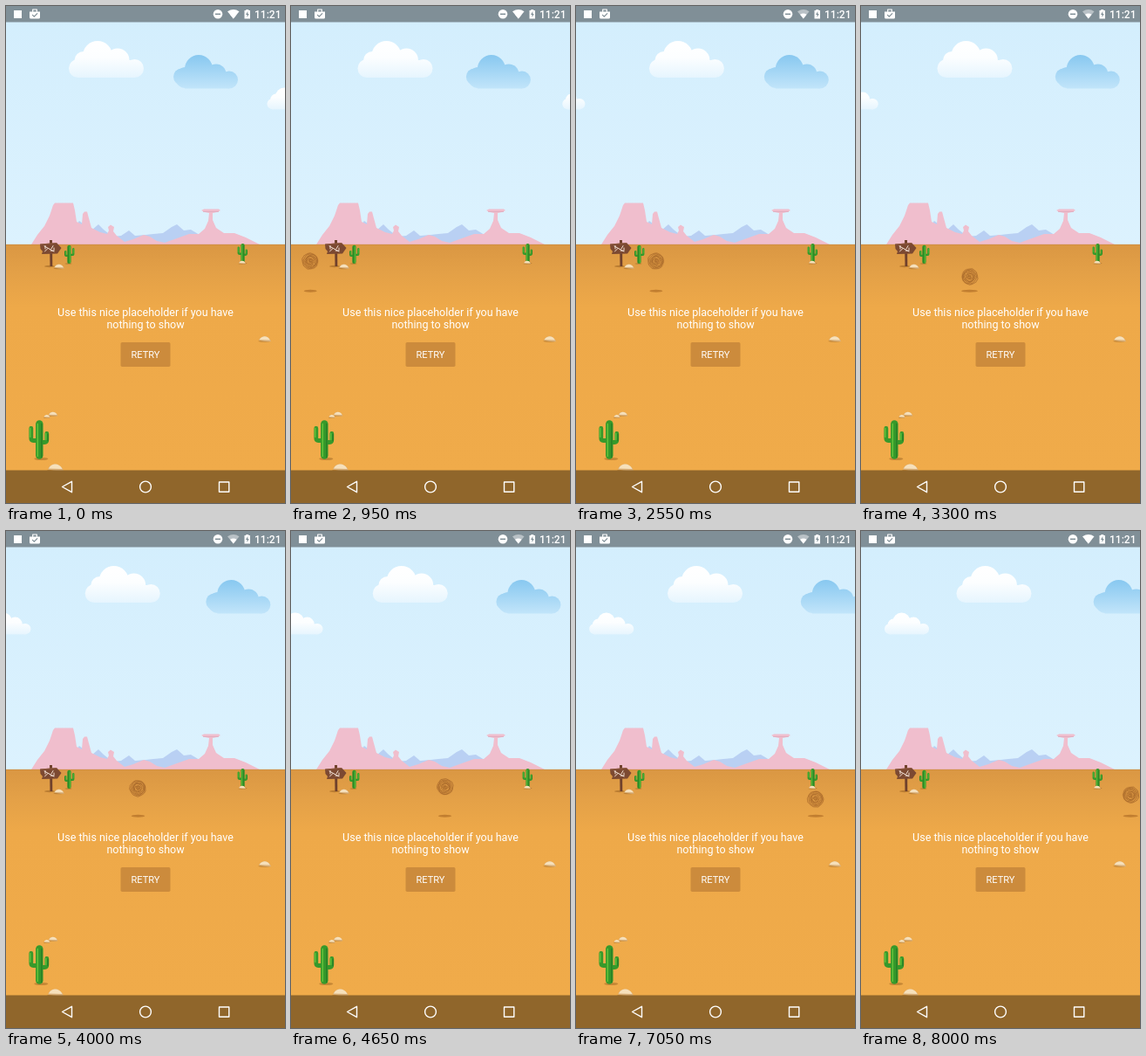
These frames come from a looping animation (320 by 569 pixels, 8050 ms). An HTML page:

```html
<!DOCTYPE html>
<html lang="en">
<head>
<meta charset="utf-8">
<title>Desert placeholder</title>
<style>
  html, body { margin: 0; width: 100%; height: 100%; overflow: hidden; background: #efaa49; }
  svg { display: block; width: 100vw; height: 100vh; }
  text { font-family: Roboto, "Noto Sans", sans-serif; fill: #fff; }
  .msg { font-size: 12.5px; text-anchor: middle; }
  .retry { font-size: 11px; text-anchor: middle; }
  .clock { font-size: 12px; font-weight: 500; }
  .line { fill: none; stroke-linecap: round; stroke-linejoin: round; }
</style>
</head>
<body>
<svg viewBox="0 0 320 569" xmlns="http://www.w3.org/2000/svg">
  <defs>
    <linearGradient id="sky" x2="0" y2="1">
      <stop stop-color="#d3eefd"/><stop offset="1" stop-color="#dcf2fe"/>
    </linearGradient>
    <linearGradient id="sand" x2="0" y2="1">
      <stop stop-color="#da9743"/><stop offset=".12" stop-color="#e3a047"/>
      <stop offset=".28" stop-color="#eea949"/><stop offset="1" stop-color="#f0ab4a"/>
    </linearGradient>
    <linearGradient id="white" gradientUnits="userSpaceOnUse" x1="0" x2="0" y1="0" y2="42">
      <stop stop-color="#fff"/><stop offset=".45" stop-color="#fcfeff"/><stop offset="1" stop-color="#e6f5fe"/>
    </linearGradient>
    <linearGradient id="blue" gradientUnits="userSpaceOnUse" x1="0" x2="0" y1="0" y2="39">
      <stop stop-color="#88c8f0"/><stop offset="1" stop-color="#c2e5fa"/>
    </linearGradient>
    <g id="cloud" fill="url(#white)">
      <circle cx="10.5" cy="31.5" r="10.5"/><circle cx="17" cy="22.5" r="10.5"/>
      <circle cx="33" cy="17" r="17"/><circle cx="56" cy="22" r="13.5"/>
      <circle cx="75.5" cy="31.5" r="10.5"/><rect x="10.5" y="22" width="65" height="20"/>
    </g>
    <g id="blueCloud" fill="url(#blue)">
      <circle cx="9.5" cy="25" r="9.5"/><circle cx="14" cy="26" r="12"/>
      <circle cx="29" cy="16" r="16"/><circle cx="49" cy="22" r="11.5"/>
      <circle cx="64" cy="28.5" r="10"/><rect x="13" y="22" width="51" height="16.5"/>
    </g>
    <g id="cactus">
      <ellipse cx="2" cy="0" rx="8" ry="1.6" fill="#a96f2a" opacity=".6"/>
      <g class="line" stroke="#36992b">
        <path d="M0,-21H-7Q-9.500,-21 -9.500,-24V-35M0,-19H6Q8.500,-19 8.500,-22V-29" stroke-width="4.800"/>
        <path d="M0,-4V-40" stroke-width="8.500"/>
      </g>
      <g class="line" stroke="#62c43b" stroke-width="1.400">
        <path d="M-2,-3V-40M-10.500,-25V-35M7.500,-22V-29"/>
      </g>
      <path class="line" d="M2.500,-2V-40M9.800,-21V-28" stroke="#277f27" stroke-width="1.400"/>
    </g>
    <g id="rock">
      <ellipse cx="-1" cy="3.200" rx="9" ry="1.200" fill="#a96f2a" opacity=".6"/>
      <path d="M-9,2Q-7,-3.500 -1,-4Q6,-4 9,3.500Q0,4.500 -9,2Z" fill="#d9b07a"/>
      <path d="M-8,1Q-6,-3.500 -1,-4Q5,-4 7.500,1.500Q0,1 -8,1Z" fill="#f6e0bb"/>
    </g>
  </defs>

  <rect width="320" height="274" fill="url(#sky)"/>
  <g id="clouds">
    <use id="c1" href="#cloud"/><use id="c2" href="#blueCloud"/><use id="c3" href="#cloud"/>
  </g>

  <path fill="#b9d0f3" d="M74,273L81,250 84,246 88,249 98,257 106,250 112,256 122,264 132,263 141,257 148,263 160,262 169,261 180,260 190,253 196,250 204,257 212,256 222,262 240,273Z"/>
  <path fill="#f0becd" d="M29,273L36,262 44,252 50,240 54,228 56,225.500H77L79,234 81,247 87,250 88,238 90,235.500H93L95,243 98,254 108,259 116,261 118,257 117,253 120,250.500 124,253 123,258 127,263 136,270 146,267 158,262 165,264 173,269 182,271 196,266 210,261 221,261 228,255 232,246 233,237 228,236 224,234 227,232.500H244L246,234 242,236 237,237 237,245 241,254 250,260 262,260 275,265 291,273Z"/>
  <path d="M226,235.500H244" stroke="#dfa9bb" stroke-width=".8"/>

  <rect y="273" width="320" height="259" fill="url(#sand)"/>
  <path d="M0,273.300H320" stroke="#cc8b43" stroke-width=".7"/>

  <use href="#cactus" transform="translate(72.500 295) scale(-.5 .48)"/>
  <use href="#cactus" transform="translate(271.500 294.500) scale(.5 .51)"/>
  <use href="#rock" transform="translate(61 298.300) scale(.65)"/>
  <use href="#rock" transform="translate(271 293.500) scale(.45)"/>
  <use href="#rock" transform="translate(297 381.300) scale(.78)"/>

  <g>
    <ellipse cx="50" cy="298" rx="6" ry="1.200" fill="#a96f2a" opacity=".7"/>
    <path d="M50,268H53L53.300,298H50.500Z" fill="#70412c"/>
    <path d="M39,272.500L58,271 63.500,277 59,283.500 41,284 42,281 39.500,278Z" fill="#7c4931"/>
    <path d="M40,273L58,271.500" stroke="#956047" stroke-width=".8"/>
    <path class="line" d="M44,275L55,281M44.500,281L48,277.500M52,278L54,274.500M45,274.500V278M55,277V280.500L51,280" stroke="#f1dfd3" stroke-width="1"/>
  </g>

  <use href="#rock" transform="translate(54 467.200) scale(.6)"/>
  <use href="#rock" transform="translate(47 469.800) scale(.42)"/>
  <use href="#cactus" transform="translate(38.300 518.500)"/>
  <use href="#rock" transform="translate(57 528.500)"/>

  <ellipse id="shade" cy="326.300" ry="1.500" fill="#bd7a2d" opacity=".9"/>
  <g id="weed" class="line">
    <circle r="9.600" fill="#c98439" opacity=".35"/>
    <path id="twigs" stroke="#a26429" stroke-width=".6"/>
  </g>

  <text class="msg" x="160" y="354.500">Use this nice placeholder if you have</text>
  <text class="msg" x="160" y="369.100">nothing to show</text>
  <rect x="131.500" y="385" width="57" height="28" rx="1.800" fill="#cc8b3c"/>
  <text class="retry" x="160" y="403">RETRY</text>

  <rect width="320" height="18.500" fill="#808f97"/>
  <g fill="#fff">
    <rect x="9" y="5" width="9" height="9"/>
    <path d="M27,6.500H39V13Q39,14.500 37.500,14.500H28.500Q27,14.500 27,13Z"/>
    <path class="line" d="M30.700,6.500V4H35.300V6.500" stroke="#fff" stroke-width="1.200"/>
    <path class="line" d="M30.500,10.300L32.300,12.200 35.800,8.600" stroke="#808f97" stroke-width="1.200"/>
    <circle cx="243" cy="9.300" r="5.300"/>
    <path d="M240,9.300H246" stroke="#808f97" stroke-width="1.500"/>
    <path id="fan" d="M254,6.300Q261,1.700 267.500,6.300L260.800,14.500Z"/>
    <path d="M257,9.800Q260.800,7.400 264.600,9.800L260.800,14.500Z"/>
    <path d="M273.500,5H275.300V4H278.200V5H280V14.500H273.500Z"/>
    <path d="M277.300,6L275,10H276.500V13L278.700,9H277.300Z" fill="#808f97"/>
  </g>
  <text class="clock" x="285" y="13.600">11:21</text>

  <rect y="531.500" width="320" height="37.500" fill="#90662b"/>
  <g class="line" stroke="#fff" stroke-width="1.400">
    <path d="M64.500,550.500L75.500,544.300V556.700Z"/>
    <circle cx="160" cy="550.500" r="6.400"/>
    <rect x="244.500" y="545" width="11.300" height="11.300"/>
  </g>
</svg>
<script>
const LOOP = 8050, STEP = 50;
const $ = id => document.getElementById(id);
const place = (id, x, y, more = "") => $(id).setAttribute("transform", `translate(${x} ${y}) ${more}`);

// Rolling ball: [ms, x, hops completed]
const ROLL = [
  [0, -19, -0.25], [1750, 57, 3.05], [3300, 124.5, 5.95], [4650, 176.5, 8.606],
  [5900, 228, 10.79], [7050, 275, 13.09], [8050, 311, 14.93]
];

function rollAt(ms) {
  const i = ROLL.findIndex(k => k[0] > ms);
  const a = ROLL[i - 1], b = ROLL[i], u = (ms - a[0]) / (b[0] - a[0]);
  return [1, 2].map(n => a[n] + (b[n] - a[n]) * u);
}

// Tangled twigs: wobbly rings around shifted centres
function twigs() {
  let seed = 7, d = "";
  const rand = () => (seed = seed * 16807 % 2147483647) / 2147483647;
  for (let ring = 0; ring < 8; ring++) {
    const r = 9.6 - ring * 1.15, turn = rand() * 6.28;
    const dx = rand() - 0.5, dy = rand() - 0.5;
    for (let i = 0; i <= 20; i++) {
      const a = turn + i * 0.31, q = r - rand() * 1.1;
      const x = Math.cos(a) * q + dx, y = Math.sin(a) * q + dy;
      d += `${i ? "L" : "M"}${x.toFixed(2)},${y.toFixed(2)}`;
    }
  }
  return d;
}

function draw(ms) {
  const s = ms / 1000;
  place("c1", 72 + 4.68 * s, 40);
  place("c2", 192 + 9.33 * s, 56);
  place("c3", ms < 1660 ? 299.5 + 12.4 * s : 27 - 12.4 * (8 - s), 93.5, "scale(.593)");

  const [x, hops] = rollAt(ms);
  const u = hops - Math.floor(hops), lift = 4 * u * (1 - u);
  place("weed", x, 314 - 22 * lift, `rotate(${230 * s})`);
  $("shade").setAttribute("cx", x);
  $("shade").setAttribute("rx", 10 - 2.5 * lift);

  $("fan").setAttribute("opacity", ms >= 1300 && ms < 7250 ? 0.45 : 1);
}

$("twigs").setAttribute("d", twigs());
const start = performance.now();
function tick() {
  const ms = (performance.now() - start) % LOOP;
  draw(Math.floor(ms / STEP) * STEP);
  requestAnimationFrame(tick);
}
tick();
</script>
</body>
</html>
```
